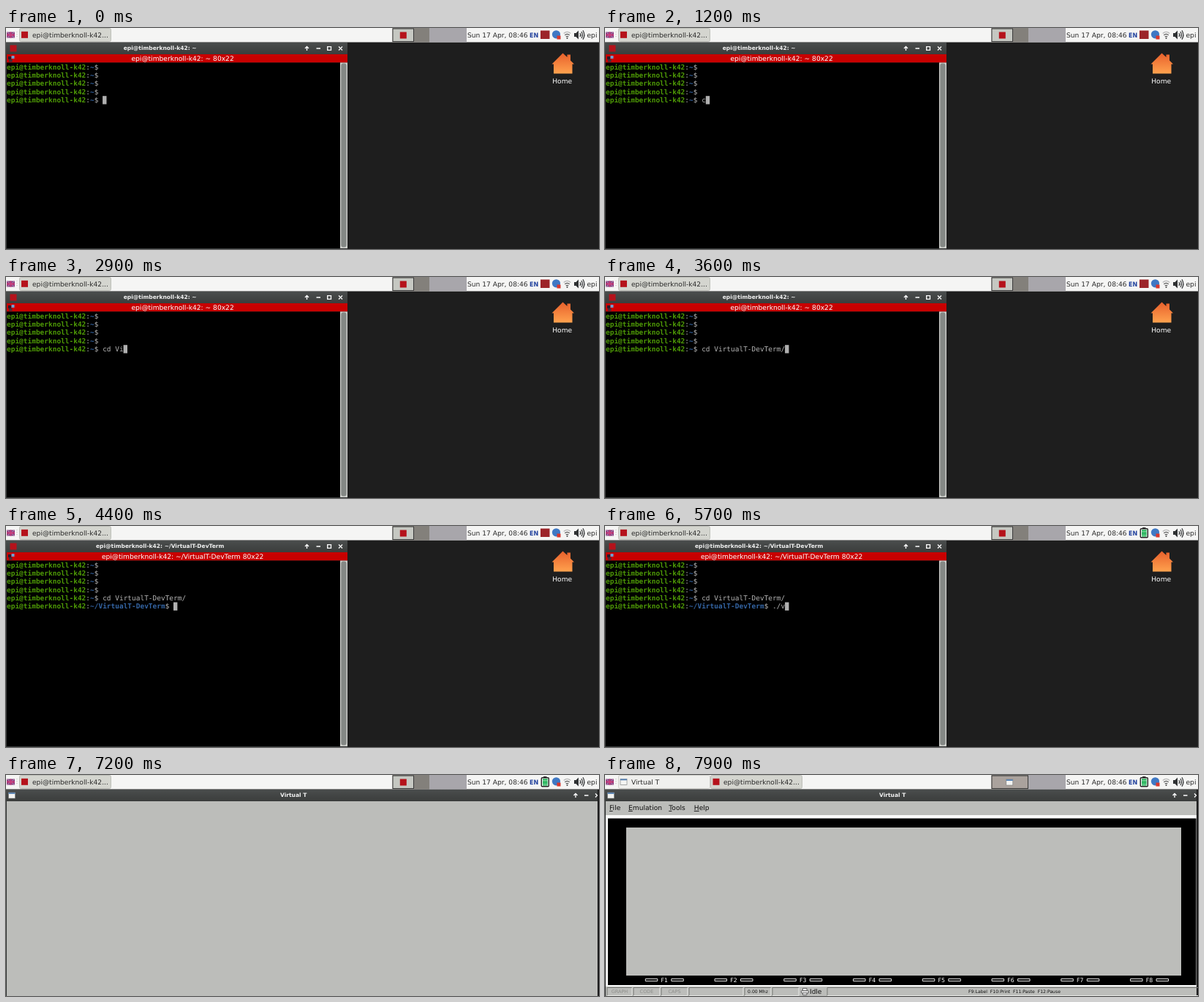
An HTML page for the animation above (8 s loop, 811 px wide and 303 px high).

```html
<!DOCTYPE html>
<html lang="en">
<head>
<meta charset="utf-8">
<title>Terminal session</title>
<style>
html, body { margin: 0; width: 100%; height: 100%; overflow: hidden; background: #1e1e1e; }
svg { display: block; width: 811px; height: 303px; }
text { font: 9.15px "DejaVu Sans", sans-serif; white-space: pre; text-rendering: geometricPrecision; fill: #2b2b2b; }
.mono text { font: 9.47px "DejaVu Sans Mono", monospace; fill: #b4b4b4; }
.mono .user { font-weight: bold; fill: #4e9a06; }
.mono .path { font-weight: bold; fill: #3465a4; }
.mid { text-anchor: middle; }
.title { font-weight: bold; font-size: 7.52px; fill: #f2f2f2; text-anchor: middle; }
.white { fill: #fff; }
.menu text { font-size: 9.15px; fill: #111; }
.status text { font-size: 6.1px; fill: #111; }
.status .dim { font-size: 6.5px; fill: #8d8e8b; }
.line { fill: none; stroke: #fff; stroke-width: 1.3; }
</style>
</head>
<body>
<svg viewBox="0 0 811 303">
  <defs>
    <linearGradient id="bar" x2="0" y2="1"><stop stop-color="#4a4d4d"/><stop offset="1" stop-color="#3b3d3c"/></linearGradient>
    <linearGradient id="roof" x2="0" y2="1"><stop stop-color="#e8602c"/><stop offset="1" stop-color="#ffa24e"/></linearGradient>
    <g id="app"><rect x="-4.5" y="-4.5" width="9" height="9" fill="#b5121b"/></g>
    <g id="win"><rect x="-4.5" y="-4" width="9" height="8" fill="#f4f4f2" stroke="#77797a" stroke-width=".6"/><rect x="-4.5" y="-4" width="9" height="2" fill="#5d86b5"/></g>
  </defs>

  <!-- desktop -->
  <rect width="811" height="303" fill="#1e1e1e"/>
  <path d="M761.5 34.5 L767.5 40 V36.5 H772 V44.5 L777 49.5 H774.5 V62.5 H749 V49.5 H746.5Z" fill="url(#roof)"/>
  <text class="mid white" x="760.7" y="76">Home</text>

  <!-- terminal window -->
  <g id="term">
    <rect y="20" width="467" height="283" fill="#333535"/>
    <rect y="20" width="467" height="16" fill="url(#bar)"/>
    <use href="#app" x="10" y="28"/>
    <text id="title" class="title" x="210.7" y="30.2"></text>
    <path class="line" d="M411.5 31 V26 M409 28 L411.5 25.5 L414 28 M424.5 28 H430 M439.7 25.7 H444.5 V30.3 H439.7Z M455 25.5 L460 30.5 M460 25.5 L455 30.5"/>
    <rect x="1" y="36" width="466" height="11.5" fill="#c80000"/>
    <path d="M3 39 H7 V43 H3Z" fill="#2a1a2a"/><path d="M7.5 38 H11.5 V42 H7.5Z" fill="#6f9fd0"/><path d="M4 43 H8.5 V46.5 H4Z" fill="#4a2a36"/>
    <text id="size" class="mid white" x="241.6" y="44.9"></text>
    <rect x="1" y="47.5" width="456" height="254.5" fill="#000"/>
    <rect x="457" y="47.5" width="10" height="254.5" fill="#cfd0cc"/>
    <rect x="458.2" y="48.5" width="7.4" height="252" rx="3" fill="#858986"/>
    <g class="mono" id="lines"></g>
    <rect id="cursor" width="5.4" height="11.3" fill="#b0b0b0"/>
  </g>

  <!-- emulator window -->
  <g id="emu">
    <rect y="20" width="809" height="283" fill="#333535"/>
    <rect y="20" width="809" height="16" fill="url(#bar)"/>
    <use href="#win" x="8" y="28"/>
    <text class="title" x="393.2" y="30.2">Virtual T</text>
    <path class="line" d="M779 31 V26 M776.5 28 L779 25.5 L781.5 28 M791 28 H796.5 M806 25.5 L809 28.5 M806 30.5 L809 27.5"/>
    <rect x="1" y="36" width="808" height="267" fill="#bcbdba"/>
    <g id="screen">
      <g class="menu" id="menu"></g>
      <rect x="1" y="55" width="808" height="235" fill="#fafafa"/>
      <rect x="4" y="59.5" width="804.5" height="228.5" fill="#000"/>
      <rect x="29" y="72" width="759" height="203" fill="#bcbdba"/>
      <g id="keys"></g>
      <g class="status" id="status">
        <rect x="1" y="290" width="808" height="13" fill="#bcbdba"/>
        <path d="M270.5 292.5 H276 V301.5 H270.5Z" fill="#fff" stroke="#444" stroke-width=".8"/>
        <rect x="268.4" y="295.6" width="10" height="3.4" rx="1" fill="#ddd" stroke="#444" stroke-width=".8"/>
        <text x="280" y="300.3" style="font-size:9px">Idle</text>
      </g>
    </g>
  </g>

  <!-- top panel -->
  <rect width="811" height="19.5" fill="#f5f5f4"/>
  <rect x="1" y="5.5" width="11" height="8" fill="#7d3f80"/>
  <path d="M1 5.5 L12 13.5 M12 5.5 L1 13.5" stroke="#c888b4" stroke-width="1"/>
  <path d="M1 9.5 H12 M6.5 5.5 V13.5" stroke="#c93a78" stroke-width="1.8"/>
  <path d="M15 5 V14" stroke="#b9b9b5" stroke-dasharray="1 2"/>
  <g id="tasksOld">
    <rect x="18.5" y=".5" width="125" height="18" rx="2" fill="#d4d5cf" stroke="#bdbeb8"/>
    <use href="#app" x="25.5" y="9.3"/>
    <text x="36" y="12.6">epi@timberknoll-k42...</text>
  </g>
  <g id="tasksNew">
    <rect x="18.5" y=".5" width="125" height="18" rx="2" fill="#f0f0ee" stroke="#cfcfca"/>
    <use href="#win" x="25.5" y="9.3"/>
    <text x="36" y="12.6">Virtual T</text>
    <rect x="144.5" y=".5" width="125" height="18" rx="2" fill="#d4d5cf" stroke="#bdbeb8"/>
    <use href="#app" x="152" y="9.3"/>
    <text x="162" y="12.6">epi@timberknoll-k42...</text>
  </g>
  <rect x="528.5" width="50.5" height="19.5" fill="#83807b"/>
  <rect x="579" width="51" height="19.5" fill="#a8a6ab"/>
  <g id="pagerOld"><rect x="529" y="1" width="28.5" height="17.5" fill="#c6c8c2" stroke="#3a3a3a"/><use href="#app" x="543.3" y="10"/></g>
  <g id="pagerNew"><rect x="529" y="1" width="49.5" height="17.5" fill="#aaa29d" stroke="#3a3a3a"/><use href="#win" x="553.3" y="10"/></g>
  <text x="631" y="12.6">Sun 17 Apr, 08:46</text>
  <text x="716" y="12.7" style="font-size:8.9px;font-weight:bold;font-stretch:condensed;fill:#1f3f9c">EN</text>
  <rect id="alert" x="731" y="3.5" width="12.5" height="11.5" fill="#9c2429"/>
  <g id="battery">
    <rect x="735" y="2" width="4.5" height="2" fill="#222"/>
    <rect x="732.3" y="3.8" width="10" height="12" rx="1" fill="#fff" stroke="#222" stroke-width="1.4"/>
    <path d="M734 6.3 H740.7 M734 8.7 H740.7 M734 11.1 H740.7 M734 13.5 H740.7" stroke="#20b357" stroke-width="2"/>
  </g>
  <circle cx="752.5" cy="8.8" r="5.6" fill="#3f78c4"/>
  <rect x="753.5" y="10.5" width="5" height="5" fill="#d9372c"/>
  <g fill="none" stroke="#555" stroke-width="1.2">
    <path d="M762.8 7.5 Q767.5 3.3 772.2 7.5" stroke="#b5b5b5"/><path d="M764.3 9.8 Q767.5 7 770.7 9.8"/><path d="M765.8 12 Q767.5 10.6 769.2 12"/>
  </g>
  <circle cx="767.5" cy="14" r="1" fill="#444"/>
  <path d="M777 7 H779.5 L783 3.5 V15.5 L779.5 12 H777Z" fill="#2f3133"/>
  <path d="M785 7 Q786.5 9.5 785 12 M787 5 Q789.6 9.5 787 14 M789 3.3 Q792.8 9.5 789 15.7" fill="none" stroke="#2f3133" stroke-width="1.2"/>
  <text x="794.5" y="12.6">epi</text>
</svg>
<script>
const $ = id => document.getElementById(id);
const add = (id, html) => $(id).insertAdjacentHTML('beforeend', html);
const show = (id, on) => { $(id).style.display = on ? '' : 'none'; };

const HOST = 'epi@timberknoll-k42', DIR = '~/VirtualT-DevTerm';
const COL = 5.7, ROW = 11.35, TOP = 47.8, LOOP = 8000;
const CD = 'cd VirtualT-DevTerm/', RUN = './virtualt-devterm ';

// start time, cursor row, typed text, cursor hidden
const steps = [
  [0, 4, ''], [1200, 4, 'c'], [1300, 4, 'cd'], [1600, 4, 'cd '], [2200, 4, 'cd ', 1],
  [2300, 4, 'cd V'], [2900, 4, 'cd Vi'], [3000, 4, 'cd Vir'], [3200, 4, 'cd Virt'],
  [3600, 4, CD], [4200, 4, CD, 1],
  [4400, 5, ''], [5000, 5, '', 1], [5300, 5, '.'], [5400, 5, './'], [5700, 5, './v'],
  [6000, 5, './vi'], [6100, 5, RUN], [6700, 5, RUN, 1], [6800, 6, '']
];

[[6, 'File'], [32, 'Emulation'], [87.3, 'Tools'], [121.8, 'Help']].forEach(([x, s]) =>
  add('menu', `<text x="${x}" y="48"><tspan text-decoration="underline">${s[0]}</tspan>${s.slice(1)}</text>`));

for (let i = 0; i < 8; i++) {
  const x = 81.3 + i * 94.75;
  add('keys', `<text class="mid white" x="${x}" y="283.8" style="font-size:7.8px">F${i + 1}</text>
    <path d="M${x - 26} 279.5h16.5v3h-16.5z M${x + 9.5} 279.5h16.5v3h-16.5z" class="line" style="stroke-width:.9"/>`);
}

[[3, 37, 'GRAPH', 'dim'], [39, 75, 'CODE', 'dim'], [77, 113, 'CAPS', 'dim'], [115, 189, ''], [191, 227, '0.00 Mhz'],
 [229, 265, ''], [304, 816, 'F9:Label  F10:Print  F11:Paste  F12:Pause']].forEach(([a, b, s, c = '']) =>
  add('status', `<path d="M${a} 302.5V291.5H${b}" fill="none" stroke="#777875"/>
    <path d="M${a} 302.5H${b}V291.5" fill="none" stroke="#e6e7e4"/>
    <text class="mid ${c}" x="${(a + b) / 2}" y="299.2">${s}</text>`));

function line(row, path, typed) {
  return `<text x="1" y="${TOP + row * ROW + 8.8}"><tspan class="user">${HOST}</tspan>:` +
    `<tspan class="path">${path}</tspan>$ ${typed}</text>`;
}

function drawTerminal([, row, typed, hidden]) {
  const path = row > 4 ? DIR : '~';
  let html = '';
  for (let r = 0; r < 4; r++) html += line(r, '~', '');
  html += line(4, '~', row > 4 ? CD : typed);
  if (row > 4) html += line(5, DIR, row > 5 ? RUN : typed);
  $('lines').innerHTML = html;
  $('title').textContent = `${HOST}: ${path}`;
  $('size').textContent = `${HOST}: ${path} 80x22`;
  const col = row > 5 ? 0 : HOST.length + path.length + 3 + typed.length;
  $('cursor').setAttribute('x', 1 + col * COL);
  $('cursor').setAttribute('y', TOP + row * ROW);
  show('cursor', !hidden);
}

let last;
function frame(now) {
  const t = now % LOOP;
  const step = steps.findLast(s => s[0] <= t);
  if (step !== last) drawTerminal(last = step);
  const ready = t >= 7900, charged = t >= 5400;
  show('emu', t >= 7200);
  show('screen', ready);
  show('tasksNew', ready);
  show('pagerNew', ready);
  show('tasksOld', !ready);
  show('pagerOld', !ready);
  show('battery', charged);
  show('alert', !charged);
  requestAnimationFrame(frame);
}
frame(performance.now());
</script>
</body>
</html>
```
